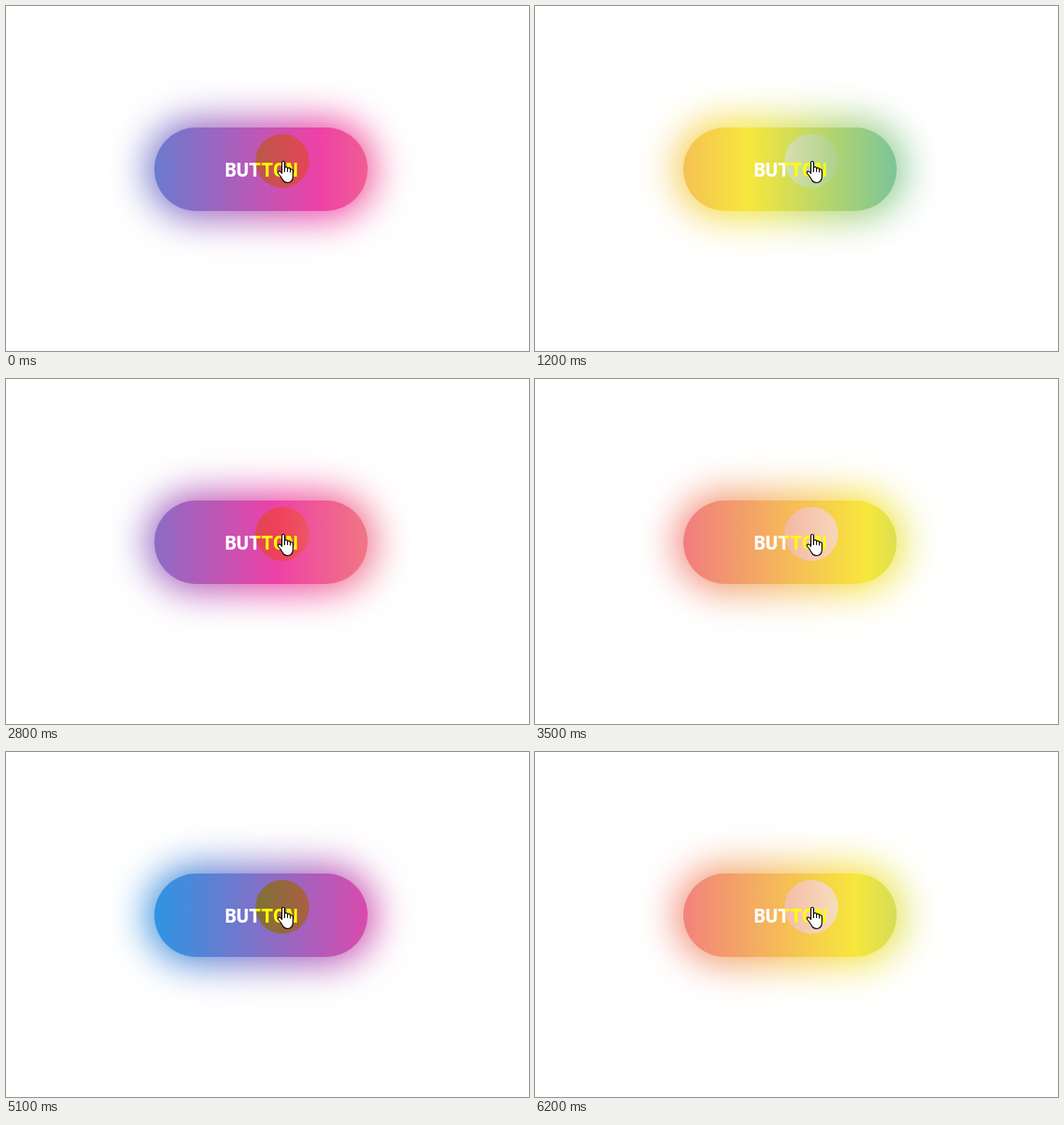
Recreate the animation shown at these times as an HTML page. Size 564 px wide and 372 px high, loop 6.3 s.

```html
<!DOCTYPE html>
<html lang="en">
<head>
<meta charset="utf-8">
<title>Gradient button</title>
<style>
  html, body {
    margin: 0;
    width: 100%;
    height: 100%;
    overflow: hidden;
    background: #fff;
  }
  .stage {
    position: relative;
    width: 564px;
    height: 372px;
    overflow: hidden;
    background: #fff;
    isolation: isolate;
  }
  .stage > * { position: absolute; }
  .flow {
    border-radius: 60px;
    background: linear-gradient(90deg, #09a5ee, #ee41a6, #f7e73c, #09a5ee) 0 0 / 400%;
    animation: slide 6.3s steps(63) infinite;
  }
  .glow {
    left: 152px;
    top: 123px;
    width: 246px;
    height: 106px;
    filter: blur(20px);
  }
  .button {
    left: 160px;
    top: 131px;
    width: 230px;
    height: 90px;
    color: #fff;
    font: bold 22px/88px "Noto Sans Mono", "DejaVu Sans Mono", monospace;
    text-align: center;
  }
  /* Inverts only the blue channel of what lies below. */
  .spot {
    left: 269px;
    top: 138px;
    width: 58px;
    height: 58px;
    border-radius: 50%;
    background: #00f;
    mix-blend-mode: difference;
  }
  .hand { left: 292px; top: 166px; }
  @keyframes slide {
    from { background-position: 18.7% 0; }
    to { background-position: 333.7% 0; }
  }
</style>
</head>
<body>
<div class="stage">
  <div class="flow glow"></div>
  <div class="flow button">BUTTON</div>
  <div class="spot"></div>
  <svg class="hand" width="19" height="26" viewBox="0 0 19 26">
    <path d="M5.5 14.5V3Q5.5 1.5 7 1.5T8.5 3V8Q11.5 7 11.8 9Q14.3 8 14.7 10Q17.5 9.5 17.5 12V17Q17.5 24.5 11.5 24.5Q8 24.5 6.5 21.5L4 17.5L1.5 14.5Q.5 12.5 2.5 12Q4 12 5.5 14.5Z"
      fill="#fff" stroke="#000" stroke-width="1.1" stroke-linejoin="round"/>
    <path d="M8.5 7.5V13M11.6 9V13M14.6 10V13.5" fill="none" stroke="#000"/>
  </svg>
</div>
</body>
</html>
```
